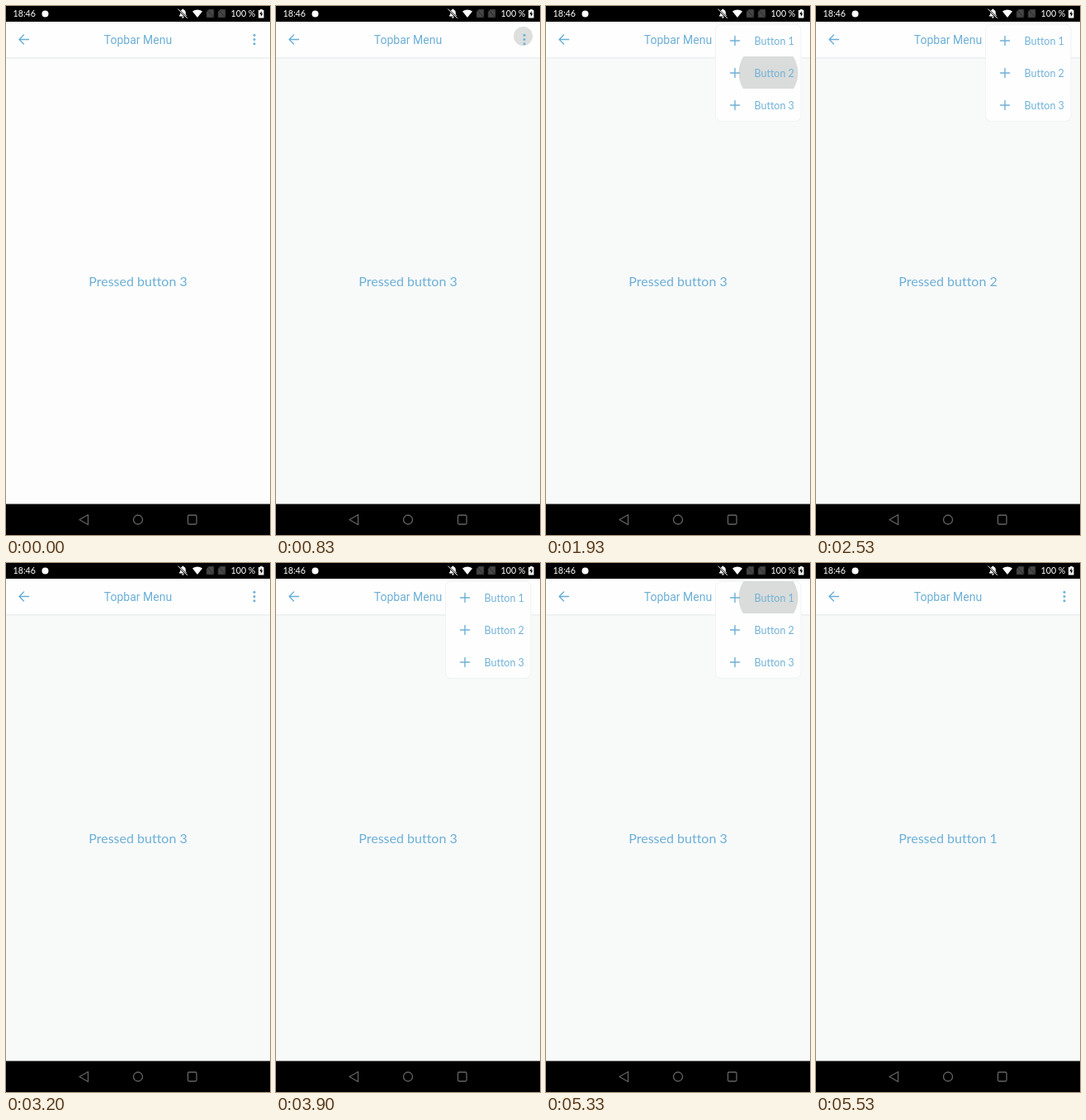
An HTML page for the animation above (5560 ms loop, 320 px wide and 640 px high).

```html
<!DOCTYPE html>
<html lang="en">
<head>
<meta charset="utf-8">
<title>Topbar Menu</title>
<style>
  html, body { margin: 0; height: 100%; overflow: hidden; background: #fff; }
  svg { display: block; width: 100vw; height: 100vh; }
  text { font-family: Lato, "Open Sans", sans-serif; font-variant-ligatures: none; }
  .line { fill: none; stroke-linecap: round; stroke-linejoin: round; }
</style>
</head>
<body>
<svg viewBox="0 0 320 640">
  <defs>
    <clipPath id="reveal"><rect id="revealBox" y="16"/></clipPath>
    <clipPath id="row"><rect x="205" y="22" width="104" height="39"/></clipPath>
    <path id="plus" class="line" d="M223.5 42h11M229 36.5v11" stroke="#6fb0d6" stroke-width="1.4"/>
    <path id="noSim" d="M246 4h6v10h-9v-7zM243 4l9 10" stroke="#222" fill="#464646" stroke-width=".8"/>
  </defs>

  <rect id="page" width="320" height="640"/>
  <rect y="19" width="320" height="43" fill="#fefefe"/>
  <rect y="62" width="320" height="1.5" fill="#eceff1"/>

  <!-- status bar -->
  <rect width="320" height="19"/>
  <g fill="#fff">
    <text x="8.5" y="13" font-size="10.7">18:46</text>
    <circle cx="47.5" cy="9.5" r="4"/>
    <path d="M210 12.5v-1l1.2-1.2V8c0-2 1.2-3.2 2.2-3.5a1 1 0 0 1 2 0c1.6.4 2.4 1.8 2.4 3.5v2.3l1.2 1.2v1zM213 13.3h2.8a1.4 1.4 0 0 1-2.8 0z"/>
    <path d="M232 14l-6-7.5a10 10 0 0 1 12 0z"/>
    <text x="272.5" y="13" font-size="10.7">100 %</text>
    <path d="M306 5h2V4h3v1h1.5v9.5H306z"/>
  </g>
  <path class="line" d="M209 4.5l10.5 10" stroke="#000" stroke-width="2.2"/>
  <path class="line" d="M208.8 4l10.7 10.5" stroke="#fff"/>
  <path d="M309.8 6l-2.5 4h1.6v3l2.4-4h-1.5z"/>
  <use href="#noSim"/>
  <use href="#noSim" x="14"/>

  <!-- top bar -->
  <path class="line" d="M27.5 40.500h-11.5M21.500 35l-5.500 5.500 5.500 5.500" stroke="#6aaed6" stroke-width="1.4"/>
  <text x="160" y="46" font-size="14" text-anchor="middle" fill="#6cafd6" style="font-family:Roboto,sans-serif">Topbar Menu</text>
  <circle id="tap" fill="#dcdfde"/>
  <g fill="#6fb0d6">
    <circle cx="301" cy="35.3" r="1.5"/>
    <circle cx="301" cy="40.5" r="1.5"/>
    <circle cx="301" cy="45.7" r="1.5"/>
  </g>

  <text id="label" x="160" y="339" font-size="16" text-anchor="middle" fill="#6cafd6"></text>

  <g id="menu" clip-path="url(#reveal)">
    <rect x="205.5" y="22" width="103.5" height="117.5" rx="7" fill="#fefefe" stroke="#f0f2f4"/>
    <g id="press"><g clip-path="url(#row)"><circle id="pressDot" cx="269.5" cy="42" fill="#d9dcda"/></g></g>
    <g id="items" fill="#72b2d7" font-size="12.5"></g>
  </g>

  <!-- navigation bar -->
  <rect y="602.5" width="320" height="37.5"/>
  <g class="line" stroke="#646464" stroke-width="1.3">
    <path d="M99.5 615.5v12l-10.5-6z"/>
    <circle cx="160" cy="621.5" r="5.5"/>
    <rect x="220.5" y="616" width="10.5" height="11" rx="1.5"/>
  </g>
</svg>
<script>
const LOOP = 5560;
// times in ms; row is the pressed item, label the number shown afterwards
const rounds = [
  { open: 830, ready: 1030, close: 1930, end: 2000, row: 1, label: 2 },
  { open: 2330, ready: 2530, close: 3130, end: 3200, row: 2, label: 3 },
  { open: 3730, ready: 3900, close: 4230, end: 4270, row: -1, label: 3 },
  { open: 4830, ready: 5030, close: 5330, end: 5530, row: 0, label: 1 }
];
const $ = id => document.getElementById(id);
const set = (id, attrs) => {
  for (const name in attrs) $(id).setAttribute(name, attrs[name]);
};
const ramp = (t, from, to) => Math.max(0, Math.min(1, (t - from) / (to - from)));

$("items").innerHTML = [0, 1, 2].map(i =>
  `<use href="#plus" y="${39 * i}"/><text x="252.5" y="${46.5 + 39 * i}">Button ${i + 1}</text>`
).join("");

function draw(t) {
  let label = 3, grow = 0, fade = 0, tap = 0, spread = 0, press = 0, row = 0;
  for (const r of rounds) {
    if (t < r.open) break;
    const hold = r.close + (r.row < 0 ? 0 : 40);
    if (t >= hold) label = r.label;
    if (t >= r.end) continue;
    grow = 1 - (1 - ramp(t, r.open + 60, r.ready)) ** 2;
    fade = t < hold ? 1 : 1 - ramp(t, hold, r.end);
    if (t < r.ready) {
      spread = ramp(t, r.open + 40, r.open + 100);
      tap = 11.5 + 4.5 * spread;
    }
    if (t >= r.close && r.row >= 0) {
      row = r.row;
      press = 36 + 30 * ramp(t, hold, hold + 80);
    }
  }
  set("page", { fill: t < 830 ? "#fcfdfc" : "#f8fafa" });
  $("label").textContent = "Pressed button " + label;
  set("tap", { r: tap, cx: 299.5 + 1.5 * spread, cy: 36.5 + 3.5 * spread });
  set("menu", { opacity: fade * Math.min(1, grow * 1.5) });
  set("revealBox", { x: 312 - 110 * grow, width: 110 * grow, height: 126 * grow });
  set("press", { transform: `translate(0 ${39 * row})` });
  set("pressDot", { r: press });
}

const start = performance.now();
function frame() {
  draw((performance.now() - start) % LOOP);
  requestAnimationFrame(frame);
}
frame();
</script>
</body>
</html>
```
